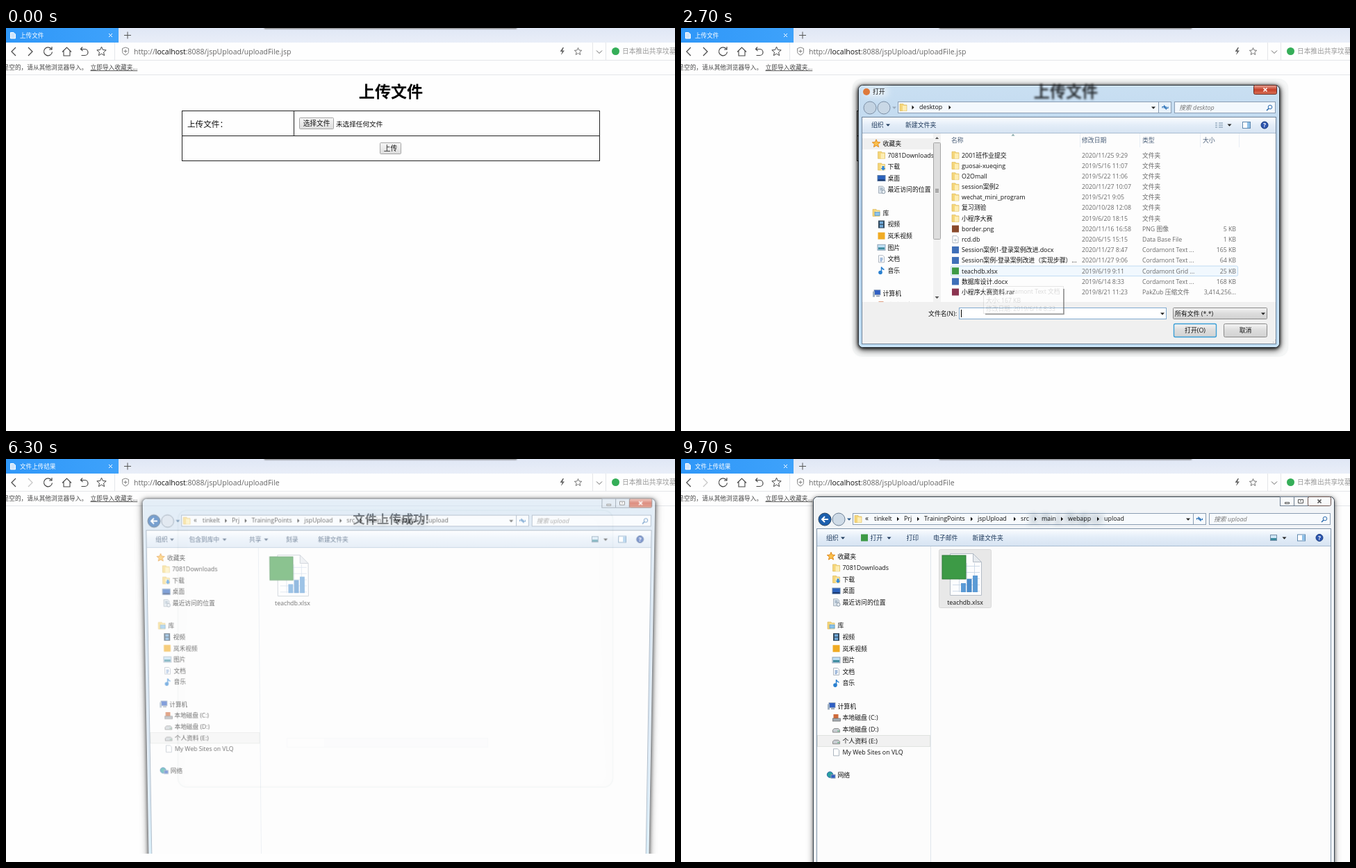
These frames come from a looping animation (963 px wide and 581 px high, 10000 ms). An HTML page:

```html
<!DOCTYPE html>
<html lang="en">
<head>
<meta charset="utf-8">
<title>File upload demo</title>
<style>
  html, body { margin: 0; width: 100%; height: 100%; overflow: hidden; background: #fefefe; }
  .layer { position: absolute; left: 0; top: 0; width: 963px; height: 581px; overflow: hidden; }
  text { font-family: "Open Sans", "Noto Sans CJK SC", "Noto Sans CJK", sans-serif; white-space: pre; }
  #dialog { transform-origin: 558px 271px; }
  #explorer { transform-origin: 565px 320px; }
</style>
</head>
<body>
<svg class="layer" id="page"></svg>
<svg class="layer" id="dialog"></svg>
<svg class="layer" id="heading"></svg>
<svg class="layer" id="explorer"></svg>
<script>
const $ = id => document.getElementById(id);

// Drawing helpers: y of a text is the middle of its line.
const T = (x, y, s, size = 8.9, fill = '#111', extra = '') =>
  `<text x="${x}" y="${y + size * .37}" font-size="${size}" fill="${fill}" ${extra}>${s}</text>`;
const R = (x, y, w, h, fill, stroke = 'none', extra = '') =>
  `<rect x="${x}" y="${y}" width="${w}" height="${h}" fill="${fill}" stroke="${stroke}" ${extra}/>`;
const P = (d, stroke = '#444', fill = 'none', w = 1, extra = '') =>
  `<path d="${d}" stroke="${stroke}" fill="${fill}" stroke-width="${w}" ${extra}/>`;
const C = (x, y, r, fill, stroke = 'none') => `<circle cx="${x}" cy="${y}" r="${r}" fill="${fill}" stroke="${stroke}"/>`;
const G = (id, body, extra = '') => `<g id="${id}" ${extra}>${body}</g>`;
const grad = (id, stops, dir = 'x2="0" y2="1"') => `<linearGradient id="${id}" ${dir}>` +
  stops.map((c, i) => `<stop offset="${i / (stops.length - 1)}" stop-color="${c}"/>`).join('') + '</linearGradient>';
const blur = (id, size) => `<filter id="${id}" x="-50%" y="-100%" width="200%" height="300%"><feGaussianBlur stdDeviation="${size}"/></filter>`;
const shadow = dark => `style="filter:drop-shadow(0 1px 2px rgba(0,0,0,${dark})) drop-shadow(0 2px 5px rgba(0,0,0,${dark}))"`;
const right = (x, y, fill = '#111') => P(`M${x - 1.5} ${y - 3}l3 3l-3 3z`, 'none', fill);
const down = (x, y, fill = '#222') => P(`M${x - 3} ${y - 1.5}h6l-3 3.3z`, 'none', fill);
const up = (x, y, fill = '#555') => P(`M${x - 2.5} ${y + 1.5}h5l-2.5 -3z`, 'none', fill);

function star(x, y, r, stroke, fill) {
  let d = '';
  for (let i = 0; i < 10; i++) {
    const a = i * Math.PI / 5, k = i % 2 ? r * .45 : r;
    d += (i ? 'L' : 'M') + (x + k * Math.sin(a)).toFixed(2) + ' ' + (y - k * Math.cos(a)).toFixed(2);
  }
  return P(d + 'z', stroke, fill);
}

const sheet = (x, y, fill = '#fff') => P(`M${x - 4} ${y - 5}h6l2 2v8h-8z`, '#9aa5b2', fill, .8);
const folder = (x, y) => P(`M${x - 5} ${y - 5}h5l1 1.5h4v8.5h-10z`, '#d9b450', '#f5d67a', .6) +
  R(x - 1, y - 2.5, 5.5, 7.5, '#fdeeb4');
const screen = (x, y) => R(x - 4, y - 5, 9, 7, '#2f5fc4', '#8b9bb0', 'stroke-width=".8"') + R(x - 1, y + 3, 5, 1.5, '#8b95a3');
const square = color => (x, y) => R(x - 5, y - 5, 10, 10, color);
const icons = {
  star: (x, y) => star(x, y, 6, '#e08a1e', '#fbc04a'),
  folder,
  load: (x, y) => folder(x, y) + P(`M${x + 1} ${y - 1}h3v3h2l-3.500 3.500l-3.500 -3.500h2z`, 'none', '#2f86d8'),
  desk: (x, y) => R(x - 5.5, y - 4, 11, 8, '#2b62bd', '#5b7ca6') + R(x - 5, y + 2, 10, 1.5, '#182f5c'),
  recent: (x, y) => sheet(x, y, '#dbe4ec') + P(`M${x - 2} ${y - 2}h4m-4 2h4`, '#7d93a8') + C(x + 3, y + 3, 2.5, '#e8eef3', '#8c9aa8'),
  lib: (x, y) => folder(x, y) + R(x - 2, y - 1, 7, 5, '#8cc3ea', '#4f8fc0', 'stroke-width=".7"'),
  film: (x, y) => R(x - 4.5, y - 5.5, 9, 11, '#334a5e') + R(x - 2.5, y - 4, 5, 3.5, '#6fa8d8') + R(x - 2.5, y + .8, 5, 3.5, '#6fa8d8'),
  app: square('#f0ab24'),
  pic: (x, y) => R(x - 5.5, y - 4, 11, 8, '#bfe0f5', '#8fa2b5') + R(x - 4.5, y, 9, 3, '#3d8b9e'),
  doc: (x, y) => sheet(x, y) + P(`M${x - 2} ${y - 1}h4m-4 2h4m-4 2h3`, '#4778b8'),
  note: (x, y) => P(`M${x} ${y + 3}v-8q1 3 4 4`, '#2a80d0', 'none', 1.5) + C(x - 1.5, y + 3, 2.8, '#2a80d0'),
  pc: (x, y) => screen(x + 1, y) + R(x - 5, y - 3, 3, 8, '#9fb0c2'),
  sys: (x, y) => R(x - 4, y - 5, 7, 6, '#cf6a3a') + R(x - 5, y + 1, 11, 4, '#a4abb2', '#666', 'stroke-width=".7"'),
  disk: (x, y) => P(`M${x - 5} ${y + 1}l2 -2h6l2 2v3.500h-10z`, '#777', '#c9ced3', .8) + R(x + 2, y + 2, 2, 1.2, '#4a6'),
  page: (x, y) => sheet(x, y),
  net: (x, y) => C(x - 1.5, y - 1, 4.2, '#2ba2a0', '#2565a8') + R(x, y - 1, 6, 5, '#2f5fc4', '#8b9bb0'),
  text: square('#3f6fb8'), grid: square('#3d9a46'), pack: square('#8b3450'), art: square('#8a4a2c'),
  data: (x, y) => sheet(x, y) + C(x, y + 1, 2, '#c7d0d8')
};

// Navigation tree, shared by both windows: [row, level, icon, label]
const tree = [
  [0, 0, 'star', '收藏夹'], [1, 1, 'folder', '7081Downloads'], [2, 1, 'load', '下载'], [3, 1, 'desk', '桌面'],
  [4, 1, 'recent', '最近访问的位置'], [6, 0, 'lib', '库'], [7, 1, 'film', '视频'], [8, 1, 'app', '岚禾视频'],
  [9, 1, 'pic', '图片'], [10, 1, 'doc', '文档'], [11, 1, 'note', '音乐'], [13, 0, 'pc', '计算机'],
  [14, 1, 'sys', '本地磁盘 (C:)'], [15, 1, 'disk', '本地磁盘 (D:)'], [16, 1, 'disk', '个人资料 (E:)'],
  [17, 1, 'page', 'My Web Sites on VLQ'], [19, 0, 'net', '网络']
];
const nav = (x, y) => tree.map(([row, level, icon, label]) => {
  const cy = y + row * 16.62;
  return icons[icon](x + level * 7.5, cy) + T(x + 9.5 + level * 7, cy, label);
}).join('');

const refresh = (x, y) => P(`M${x - 4} ${y + 1}v-2h4m-2 -2l2 2l-2 2M${x + 4} ${y - 1}v2h-4m2 2l-2 -2l2 -2`, '#2b72b8', 'none', 1.1);
const lens = (x, y) => C(x + 1, y - 1, 2.8, 'none', '#2d6cae') + P(`M${x - 1} ${y + 1}l-3 3`, '#2d6cae', 'none', 1.6);
const help = (x, y) => C(x, y, 5, '#2c55b0', '#173a7a') + T(x, y, '?', 8.5, '#fff', 'text-anchor="middle" font-weight="700"');
const pane = (x, y) => R(x - 5.5, y - 4.5, 11, 9, '#fff', '#5e87ad') + R(x + 1, y - 4, 4, 8, '#8fc0e8');

function buildPage() {
  const button = (id, x, y, w, label) =>
    R(x + .5, y + .5, w - 1, 16, 'url(#btn)', '#a5a5a5', 'rx="1"') +
    G(id, R(x + .5, y + .5, w - 1, 16, 'url(#btnHot)', '#4d9fd0', 'rx="1"')) +
    T(x + w / 2, y + 8.8, label, 9.7, '#111', 'text-anchor="middle"');
  const line = '#474747';
  $('page').innerHTML = '<defs>' + grad('tabs', ['#e0e7f5', '#e9eef8']) + grad('tab', ['#2f97f8', '#3ea2fb'], 'x2="1" y2="0"') +
    grad('btn', ['#f6f6f6', '#dddddd']) + grad('btnHot', ['#eaf6fd', '#b9e0f6']) + blur('soft', 1.2) + '</defs>' +
    R(0, 0, 963, 581, '#fefefe') + R(0, 0, 963, 21, 'url(#tabs)') + R(0, 0, 162, 21, 'url(#tab)') +
    R(372, -3, 363, 4, '#555', 'none', 'filter="url(#soft)"') + R(372, -2, 363, 2.5, '#a5a5a5') +
    P('M6.500 6.500h4.500l2.500 2.500v6h-7z', '#fff', '#cfe5fb') +
    G('tabA', T(20, 11, '上传文件', 8.6, '#fff')) + G('tabB', T(20, 11, '文件上传结果', 8.6, '#fff')) +
    P('M148 8l5 5m0 -5l-5 5', '#fff') + P('M170 10.500h10m-5 -5v10', '#555') +
    P('M0 46.500h963M0 67.500h963', '#e4e6e9') + P('M156.500 21v25M844.500 21v25M863.500 21v25', '#e4e6e9') +
    P('M14 28l-6 6l6 6', line, 'none', 1.2) + G('fwd', P('M32 28l6 6l-6 6', '#444', 'none', 1.2)) +
    P('M65.500 30.500a6 6 0 1 0 1 4M66 27v4h-4', line, 'none', 1.2) +
    P('M81 34.500l6.500 -6.500l6.500 6.500M83 33v7h9v-7', line, 'none', 1.1) +
    P('M110 27.500l-2.500 3l3 2.500M108 30.500h5.500a4.500 4.500 0 0 1 0 9h-5', line, 'none', 1.2) +
    star(137.500, 34, 7, line, 'none') +
    P('M172 28l4.500 1.500v4q0 4 -4.500 5.500q-4.500 -1.500 -4.500 -5.500v-4zM169.500 33.500h5m-2.500 -2.500v5', '#777', 'none', .9) +
    G('url', T(184, 34, 'http://<tspan fill="#111">localhost</tspan>:8088/jspUpload/uploadFile<tspan id="ext">.jsp</tspan>', 10.5, '#666')) +
    P('M801.500 28l-4 6h3l-1.500 5l5 -6.500h-3l2 -4.500z', 'none', '#666') + star(823.500, 34, 5.5, '#777', 'none') +
    P('M850 32.500l4 4l4 -4', '#666') + C(877.500, 33.500, 5.5, '#35ae58') + T(887, 33.500, '日本推出共享坟墓', 9.7, '#999') +
    T(-4.500, 57, '是空的，请从其他浏览器导入。', 8.7, '#444') +
    T(121.500, 57, '立即导入收藏夹...', 8.7, '#444', 'text-decoration="underline"') +
    G('halo', R(247.5, 74, 626, 399, '#f1f3f3', '#eef1f1', 'id="haloBox" rx="13" stroke-width="2"') +
      G('trace', P('M275 86h565q12 0 12 14l11 355q0 15 -14 15h-585q-8 0 -8 -10l6 -360q1 -14 13 -14z', 'none', '#fefefe') +
        R(404.5, 402.5, 289, 13, '#f9fafc', '#f2f4f6') + R(405, 403, 53, 12, '#fefefe'))) +
    G('form', R(253.5, 119.5, 601, 72, '#fefefe', '#222') + P('M253.500 155.500h601M414.500 120v35', '#222') +
      T(261, 138.500, '上传文件：', 11.6) + button('hotPick', 422, 129, 50, '选择文件') +
      G('none', T(475, 138, '未选择任何文件', 9.65)) + G('chosen', T(475, 138, 'teachdb.xlsx', 9.65)) +
      button('hotSend', 538, 165, 31, '上传'));
  $('heading').innerHTML = G('titleA', T(554, 91, '上传文件', 23.1, '#000', 'text-anchor="middle" font-weight="700"')) +
    G('titleB', T(554, 86.300, '文件上传成功!', 17.4, '#000', 'text-anchor="middle" font-weight="700"'));
}

const files = [
  ['2001班作业提交', '2020/11/25 9:29'], ['guosai-xueqing', '2019/5/16 11:07'], ['O2Omall', '2019/5/22 11:06'],
  ['session案例2', '2020/11/27 10:07'], ['wechat_mini_program', '2019/5/21 9:05'], ['复习测验', '2020/10/28 12:08'],
  ['小程序大赛', '2019/6/20 18:15'],
  ['border.png', '2020/11/16 16:58', 'PNG 图像', '5 KB', 'art'],
  ['rcd.db', '2020/6/15 15:15', 'Data Base File', '1 KB', 'data'],
  ['Session案例1-登录案例改进.docx', '2020/11/27 8:47', 'Cordamont Text ...', '165 KB', 'text'],
  ['Session案例-登录案例改进（实现步骤）...', '2020/11/27 9:06', 'Cordamont Text ...', '64 KB', 'text'],
  ['teachdb.xlsx', '2019/6/19 9:11', 'Cordamont Grid ...', '25 KB', 'grid'],
  ['数据库设计.docx', '2019/6/14 8:33', 'Cordamont Text ...', '168 KB', 'text'],
  ['小程序大赛资料.rar', '2019/8/21 11:23', 'PakZub 压缩文件', '3,414,256...', 'pack']
];
const rowY = i => 183.3 + i * 15.18;

function buildDialog() {
  const gray = '#6a6a6a', mid = 'text-anchor="middle"', end = 'text-anchor="end"';
  const list = files.map(([name, date, type = '文件夹', size = '', icon = 'folder'], i) => {
    const y = rowY(i);
    return icons[icon](395, y) + T(404, y, name) + T(577, y, date, 8.75, gray) + T(664, y, type, 8.75, gray) + T(799, y, size, 8.75, gray, end);
  }).join('');
  const heads = [[389, '名称'], [577, '修改日期'], [664, '类型'], [751, '大小']].map(([x, s]) => T(x, 161.5, s, 8.9, '#4c607a')).join('');
  $('dialog').innerHTML = '<defs>' + grad('glass', ['#c9dff2', '#b3cfe9', '#c2e0f6']) + grad('tool', ['#fafcff', '#e3edf8', '#d7e4f2']) +
    grad('red', ['#e9a99b', '#c6402a', '#d9745a']) + grad('gray', ['#f4f4f4', '#dcdcdc', '#d2d2d2']) +
    grad('hot', ['#d9f0fc', '#9bd3f3', '#7cc0ea']) + blur('glow', 5) + '</defs>' +
    R(255.5, 82.5, 606, 378, 'url(#glass)', '#28323c', 'rx="6" ' + shadow(.8)) +
    G('dim', R(256, 83, 605, 377, '#4f6a8c', 'none', 'rx="5"')) +
    R(256.5, 83.5, 604, 376, 'none', '#eaf5fd', 'rx="5" opacity=".6"') +
    R(264, 87, 34, 11, '#fff', 'none', 'rx="5" opacity=".7" filter="url(#glow)"') +
    G('mark', C(267, 92, 5, '#de7a3c')) + G('caption', T(276, 92, '打开')) +
    R(824.5, 82.5, 33, 13, 'url(#red)', '#6b2a22', 'rx="2"') + P('M838.500 86.500l5 5m0 -5l-5 5', '#fff', 'none', 1.6) +
    C(272, 115, 9, '#c3d3e2', '#7d90a6') + C(292, 115, 9, '#c9d8e6', '#7d90a6') + down(307, 115, '#9ab') +
    R(312.5, 106.5, 375, 16, '#f3f8fd', '#8a9db3') + folder(320, 114.500) + right(334, 114.500) + T(343, 114, 'desktop') + right(387, 114.500) + down(680, 115) +
    R(687.5, 106.5, 18, 16, '#e8f2fb', '#8a9db3') + refresh(697, 114.500) +
    R(710.5, 106.5, 145, 16, '#f3f8fd', '#8a9db3') + T(717, 114.500, '搜索 desktop', 8.9, '#777', 'font-style="italic"') + lens(847, 115) +
    R(260.5, 128.5, 596, 327, '#fdfdfd', '#6f8399') + R(261, 129, 595, 22, 'url(#tool)') + P('M261 151.500h595', '#a9bdd2') +
    T(274, 140, '组织', 8.9, '#1e395b') + down(298, 140, '#1e395b') + T(323, 140, '新建文件夹', 8.9, '#1e395b') +
    P('M769 137h3m2 0h6m-11 3h3m2 0h6m-11 3h3m2 0h6', '#7690a8') + down(789.500, 140) + pane(814, 140) + help(840, 140) +
    R(261, 159, 102, 16, '#f0f0f0') +
    '<svg x="261" y="152" width="102" height="243" viewBox="261 152 102 243">' + nav(281, 166.7) + '</svg>' +
    R(363, 152, 11, 243, '#f2f2f2') + R(363.5, 165.5, 10, 139, '#dedede', '#a6a6a6', 'rx="1"') +
    P('M366 232.500h5m-5 2h5m-5 2h5', '#777') + up(368.500, 158.500) + down(368.500, 388.500, '#555') +
    heads + P('M574.500 152v20M660.500 152v20M747.500 152v20M803.500 152v20', '#e8eef5') + up(478, 154, '#8aa') +
    G('rowHot', R(388.5, 0, 413, 14.5, '#f1f8fe', '#c2dcf3', 'rx="2"')) +
    G('rowSet', R(388.5, rowY(11) - 7.2, 413, 14.5, '#eeeeee', '#d8d8d8', 'rx="2"')) + list +
    R(261, 395, 595, 60, '#f0f0f0') + T(397, 412, '文件名(N):', 8.9, '#111', end) +
    R(400.5, 403.5, 298, 16, '#fff', '#7fa9cf') + down(693, 412) +
    G('caret', P('M403.500 406v11', '#000')) +
    G('picked', R(404, 405.5, 53, 13, '#3399ff') + T(405, 412, 'teachdb.xlsx', 8.9, '#fff')) +
    R(708.5, 403.5, 135, 16, 'url(#gray)', '#8a8a8a', 'rx="1"') + T(711, 412, '所有文件 (*.*)') + down(838, 412) +
    R(709.5, 426.5, 61, 19, 'url(#gray)', '#3c9fd6', 'rx="2" stroke-width="1.400"') +
    G('openHot', R(709.5, 426.5, 61, 19, 'url(#hot)', '#2f7fb5', 'rx="2"')) + T(740, 436, '打开(O)', 8.9, '#111', mid) +
    R(781.5, 426.5, 62, 19, 'url(#gray)', '#8a8a8a', 'rx="2"') + T(812.5, 436, '取消', 8.9, '#111', mid) +
    P('M852 453h1m2 0h1m-1 -3h1', '#aaa') +
    G('tip', G('tipBody', R(435.5, 372.5, 115, 39, '#fff', '#999') +
      ['类型: Cordamont Text 文档', '大小: 167 KB', '修改日期: 2019/6/14 8:33'].map((s, i) => T(439, 380 + i * 12.5, s, 8.7, '#666')).join('')) +
      P('M438 412.500h113V376', '#777', 'none', 1.6, 'opacity=".8"'));
}

function buildExplorer() {
  const ink = '#1e395b';
  const crumbs = [[278, 'tinkelt'], [321, 'Prj'], [350, 'TrainingPoints'], [427, 'jspUpload'], [489, 'src'], [519, 'main'], [557, 'webapp'], [609, 'upload']];
  const tools = items => items.map(([x, s]) => T(x, 114, s, 8.9, ink)).join('');
  const frame = (id, fill, dark) => G(id, R(190.5, 54.5, 750, 560, fill, '#38424c', 'rx="6" ' + shadow(dark)) +
    R(191.5, 55.5, 748, 560, 'none', '#f4faff', 'rx="5" opacity=".8"'));
  const caps = (id, a, b, x) => G(id, R(862.5, 54.5, 20, 13, a, '#6d7d8f') + R(882.5, 54.5, 20, 13, a, '#6d7d8f') + R(902.5, 54.5, 33, 13, b, '#6d5550', 'rx="2"') +
    P('M869.500 62.500h6v2h-6zM888.500 58.500h7v5h-7zM891 60.500h2', '#555', '#fff') + P('M916.500 58.500l5 5m0 -5l-5 5', x, 'none', 1.7));
  const tile = (id, fill, stroke) => G(id, R(371.5, 130.5, 75, 84, fill, stroke, 'rx="2"'));
  $('explorer').innerHTML = '<defs>' + grad('frameOn', ['#d3e3f2', '#bfd5ea', '#c6dcef', '#bfe4f6']) + grad('tileOn', ['#d9e8fb', '#bcd6f6']) +
    blur('haze', 3) + '</defs>' +
    frame('frameA', 'url(#frameOn)', .8) + frame('frameB', '#f1f4f7', .4) +
    caps('capsA', '#d3e1ee', 'url(#red)', '#fff') + caps('capsB', '#f8fafb', '#f8fafb', '#555') +
    C(207, 87, 9, '#1c5fae', '#24405f') + P('M212 87h-9m4 -4l-4 4l4 4', '#fff', 'none', 2) + C(227, 87, 9, '#cfdbe7', '#6d8095') + down(242, 87, '#2b5a8c') +
    R(247.5, 78.5, 508, 16, '#f7fafd', '#8a9db3') + P('M737.500 79v15', '#8a9db3') +
    T(554, 86.300, '文件上传成功!', 17.4, '#2c4a60', 'text-anchor="middle" font-weight="700" filter="url(#haze)" opacity=".35"') +
    folder(255, 86.500) + T(265, 85.500, '«', 10) + crumbs.map(([x, s]) => T(x, 86, s)).join('') +
    crumbs.slice(1).map(([x]) => right(x - 8.5, 86.5)).join('') + down(730, 87) + refresh(746.500, 86.500) +
    R(760.5, 78.5, 174, 16, '#f7fafd', '#8a9db3') + T(767, 87, '搜索 upload', 8.9, '#777', 'font-style="italic"') + lens(926, 87) +
    R(195.5, 100.5, 740, 500, '#fcfcfc', '#7f93a8') + R(196, 101, 739, 24, 'url(#tool)') + P('M196 125.500h739', '#a9bdd2') +
    tools([[209, '组织']]) + down(233, 114, ink) +
    G('toolsA', tools([[258, '包含到库中'], [346, '共享'], [400, '刻录'], [447, '新建文件夹']]) + down(310, 114, ink) + down(371, 114, ink)) +
    G('toolsB', icons.grid(264, 113.5) + tools([[272.5, '打开'], [324.5, '打印'], [363, '电子邮件'], [419.5, '新建文件夹']]) + down(299.500, 114, ink)) +
    R(848.5, 109.5, 9, 8, '#cfe6f7', '#7690a8') + R(849, 114, 8, 3, '#3d8b9e') + down(868.500, 114) + pane(893, 113.500) + help(919, 113.500) +
    P('M359.500 126v460', '#dfe5ec') +
    R(196.5, 398.5, 162, 16, '#f1f1f1', '#e0e3e0') +
    G('navHot', R(196.5, 0, 162, 16, '#e9f4fe', '#b8d6f4', 'rx="2"')) +
    G('arrows', [0, 6, 13, 19].map(r => P(`M206 ${137 + r * 16.62}l4 3.500l-4 3.500z`, '#666')).join('')) + nav(216, 140.3) +
    tile('tileHot', '#eef6fe', '#b8d6f4') + tile('tileOnBox', 'url(#tileOn)', '#7da2ce') + tile('tileOff', '#e8e8e8', '#d9d9d9') +
    P('M387.500 136.500h33l12 12v48h-45z', '#b4bcc6', '#fdfdfe') + P('M420.500 136.500v12h12z', '#b4bcc6', '#e6eaee') +
    P('M391 154.500h39m-39 9h39m-39 9h39m-39 9h39m-39 9h39M400.500 150v42m11 -42v42m11 -42v42', '#c5d3e4', 'none', .8) +
    R(403, 179, 7, 13, '#5b9bd5') + R(411.5, 173, 7, 19, '#4a8ccb') + R(420, 168, 7, 24, '#5b9bd5') +
    R(376, 139, 34, 34, '#3d9a46', '#2c7a36') + T(409, 207, 'teachdb.xlsx', 8.9, '#111', 'text-anchor="middle"');
}

const show = (id, on) => { $(id).style.opacity = +on; };
// Value of the last step begun at time t
const at = (t, steps) => steps.reduce((v, [from, next]) => t >= from ? next : v, 0);
const within = (t, a, b) => t >= a && t < b;
const fade = (t, a, b) => Math.min(1, Math.max(0, (t - a) / (b - a)));

// Windows open and close by shrinking and leaning slightly; p = 0 is upright.
function tilt(el, p, alpha) {
  el.style.visibility = alpha ? 'visible' : 'hidden';
  el.style.opacity = alpha;
  el.style.transform = p ? `perspective(1000px) translateY(${-2 * p}px) scale(${1 - .034 * p}) rotateX(${-3.3 * p}deg)` : 'none';
}

function draw(t) {
  const done = t >= 4600, flat = within(t, 2200, 3600);
  show('tabA', !done); show('tabB', done);
  show('form', !done); show('titleA', !done); show('titleB', done);
  $('ext').style.display = done ? 'none' : '';
  show('fwd', t < 4700 ? 1 : .3);
  show('hotSend', at(t, [[700, .8], [800, 0], [4300, 1]]));
  show('hotPick', at(t, [[1000, .8], [1400, 1], [1500, .8], [1900, 0]]));
  show('none', t < 3900); show('chosen', t >= 3900);
  show('halo', at(t, [[2200, .5], [3000, 1]]));
  show('trace', t >= 3900);
  $('haloBox').setAttribute('fill', t < 3900 ? '#f1f3f3' : '#fbfdfd');
  $('heading').style.filter = flat ? 'blur(1.6px)' : 'none';
  $('titleA').style.opacity = done ? 0 : at(t, [[0, 1], [1900, .9], [2200, .78], [3600, .8], [3900, 1]]);

  tilt($('dialog'), at(t, [[1900, 1.5], [2000, 1], [2100, .3], [2200, 0], [3600, .08], [3700, .2], [3800, .9]]),
    at(t, [[1900, .35], [2000, .72], [2100, .93], [2200, 1], [3700, .98], [3800, .5], [3900, 0]]));
  show('dim', at(t, [[1900, .5], [2100, .3], [2200, 0], [3600, .3]]));
  show('mark', t < 3600);
  $('caption').setAttribute('transform', `translate(${t < 3600 ? 0 : -14} 0)`);
  const row = at(t, [[2300, 3], [2400, 7], [2500, 12], [2700, 11]]);
  $('rowHot').setAttribute('transform', `translate(0 ${rowY(row) - 7.2})`);
  show('rowHot', t < 3000 ? (row ? 1 : .6) : 0);
  show('rowSet', t >= 3000); show('caret', t < 3000); show('picked', t >= 3000);
  show('openHot', at(t, [[3200, .35], [3300, .7], [3400, 1]]));
  show('tip', within(t, 2500, 2900));
  show('tipBody', at(t, [[2500, .9], [2700, .22], [2800, .1]]));

  tilt($('explorer'), within(t, 6300, 6400) ? .8 : 0, at(t, [[6300, .6], [6400, 1]]));
  const active = t < 9700, chosen = t >= 7100;
  for (const id of ['frame', 'caps']) { show(id + 'A', active); show(id + 'B', !active); }
  show('toolsA', !chosen); show('toolsB', chosen);
  $('navHot').setAttribute('transform', `translate(0 ${132.3 + 16.62 * at(t, [[6700, 14], [6800, 10], [6900, 4]])})`);
  show('navHot', at(t, [[6700, .9], [7000, 0]]));
  show('tileHot', within(t, 7000, 7100));
  show('tileOnBox', chosen && active); show('tileOff', !active);
  show('arrows', t < 6700 ? 0 : .15 * (1 - fade(t, 7700, 8600)));
}

buildPage();
buildDialog();
buildExplorer();

let last = -1;
function tick() {
  const t = Math.floor(performance.now() % 10000 / 100) * 100;
  if (t !== last) draw(last = t);
  requestAnimationFrame(tick);
}
tick();
</script>
</body>
</html>
```
